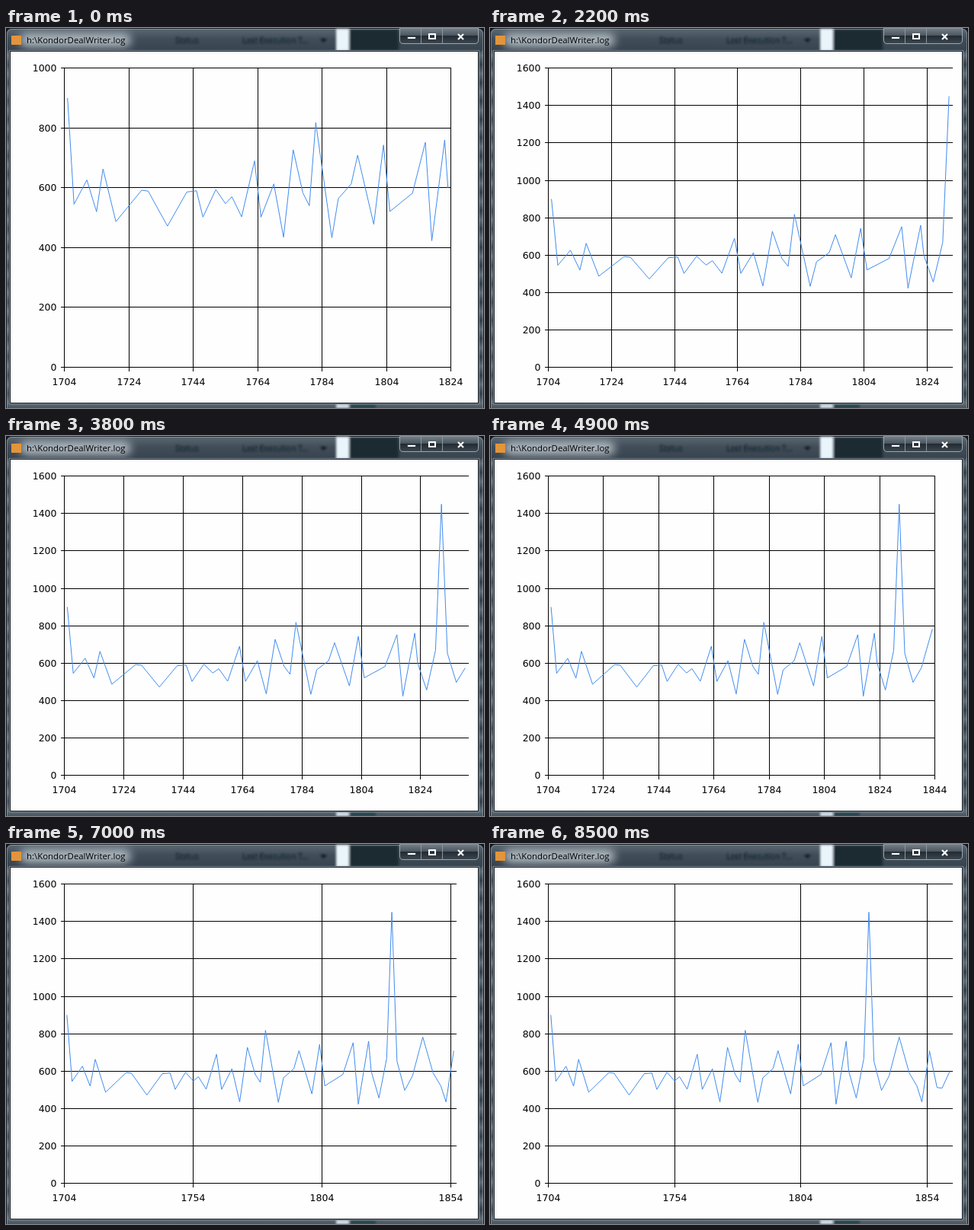
An HTML page that plays this animation: 627x499 px, repeating every 9 s.

```html
<!DOCTYPE html>
<html lang="en">
<head>
<meta charset="utf-8">
<title>Log chart</title>
<style>
  html, body { margin: 0; width: 100%; height: 100%; overflow: hidden; background: #1d252d; }
  svg { display: block; }
  .title { font: 11.4px "Open Sans", "Noto Sans", sans-serif; fill: #000; }
  .haze { font: 10.5px "Open Sans", "Noto Sans", sans-serif; fill: #10171d; }
  .label { font: 12.5px "DejaVu Sans", sans-serif; fill: #000; }
  .grid { stroke: #000; fill: none; shape-rendering: crispEdges; }
  .data { stroke: #418cf0; fill: none; stroke-linejoin: round; }
</style>
</head>
<body>
<svg width="627" height="499" viewBox="0 0 627 499">
  <defs>
    <linearGradient id="bar" x1="0" y1="0" x2="0" y2="1">
      <stop offset="0" stop-color="#5b6771"/>
      <stop offset=".45" stop-color="#414d58"/>
      <stop offset="1" stop-color="#36424c"/>
    </linearGradient>
    <linearGradient id="side" gradientUnits="userSpaceOnUse" x1="0" y1="0" x2="0" y2="24" spreadMethod="repeat">
      <stop offset="0" stop-color="#35414c"/>
      <stop offset=".5" stop-color="#62707c"/>
      <stop offset="1" stop-color="#35414c"/>
    </linearGradient>
    <linearGradient id="button" x1="0" y1="0" x2="0" y2="1">
      <stop offset="0" stop-color="#77828b"/>
      <stop offset=".48" stop-color="#4a555e"/>
      <stop offset=".5" stop-color="#222b33"/>
      <stop offset="1" stop-color="#3b4750"/>
    </linearGradient>
    <filter id="soft" x="-20%" y="-80%" width="140%" height="260%"><feGaussianBlur stdDeviation="6"/></filter>
    <filter id="blur" x="-20%" y="-50%" width="140%" height="200%"><feGaussianBlur stdDeviation="1.5"/></filter>
  </defs>

  <!-- window frame -->
  <rect width="627" height="499" fill="#12181e"/>
  <rect x=".5" y=".5" width="626" height="505" rx="7" fill="url(#side)" stroke="#10161c"/>
  <rect x="1" y="1" width="625" height="30" rx="6" fill="url(#bar)"/>
  <g filter="url(#blur)">
    <rect x="433" y="1" width="17" height="29" fill="#eaf4fb"/>
    <rect x="433" y="494" width="17" height="5" fill="#dbe8f1"/>
    <rect x="451" y="2" width="64" height="28" fill="#1b2a30"/>
    <rect x="451" y="495" width="34" height="4" fill="#24424a"/>
    <text class="haze" x="222" y="20">Status</text>
    <text class="haze" x="310" y="20">Last Execution T...</text>
    <path d="M412 14h9l-4.5 5z" fill="#10171d"/>
  </g>
  <rect x="1.5" y="1.5" width="624" height="505" rx="6" fill="none" stroke="#c9d3da" opacity=".4"/>
  <rect x="18" y="7" width="146" height="18" rx="9" fill="#c3ccd3" opacity=".85" filter="url(#soft)"/>
  <rect x="7" y="10" width="13" height="12" fill="#e2953b"/>
  <text class="title" x="27" y="20">h:\KondorDealWriter.log</text>

  <!-- window buttons -->
  <path d="M516.5 0V16q0 4.5 4.5 4.5H615q4.500 0 4.500-4.500V0z" fill="url(#button)" stroke="#9aa5ad"/>
  <path d="M544.500 0V20M572.500 0V20" stroke="#8b969f"/>
  <rect x="526.500" y="11.500" width="11" height="3" fill="#fff" stroke="#39434b"/>
  <rect x="555" y="8" width="8" height="6" fill="none" stroke="#fff" stroke-width="2"/>
  <path d="M593 8l7 7M600 8l-7 7" stroke="#fff" stroke-width="2.200"/>

  <!-- client area -->
  <rect x="4.500" y="29.500" width="616" height="464" fill="none" stroke="#7d8993"/>
  <rect x="5.500" y="30.500" width="614" height="462" fill="#fefefe" stroke="#11161b"/>
  <g id="chart" transform="translate(.5 .5)"></g>
</svg>
<script>
  // turning points already logged: [sequence number, value]
  const logged = [
    [1705, 900], [1707, 545], [1711, 626], [1714, 520], [1716, 663], [1720, 487], [1728, 592],
    [1730, 589], [1736, 472], [1742, 586], [1745, 590], [1747, 502], [1751, 594], [1754, 547],
    [1756, 570], [1759, 503], [1763, 690], [1765, 502], [1769, 613], [1772, 435], [1775, 727],
    [1778, 583], [1780, 540], [1782, 818], [1787, 433], [1789, 564], [1793, 613], [1795, 709],
    [1800, 478], [1803, 743], [1805, 521], [1812, 582], [1816, 752], [1818, 423], [1822, 760],
    [1823, 600]
  ];
  // points that arrive while the log grows: [sequence number, value, ms]
  const arriving = [
    [1826, 456, 200], [1829, 668, 800], [1831, 1450, 2200], [1833, 653, 2800], [1836, 497, 3200],
    [1839, 574, 3800], [1843, 782, 4900], [1847, 590, 5500], [1850, 521, 6000], [1852, 435, 6400],
    [1855, 708, 7000], [1858, 512, 7500], [1860, 509, 8000], [1863, 598, 8500]
  ];
  const loop = 9000, start = 1704;
  const plot = { left: 76, right: 605.75, top: 52.25, bottom: 445, lastLabel: 583.4 };
  const chart = document.getElementById("chart");

  const label = (x, y, anchor, text) =>
    `<text class="label" x="${x}" y="${y}" text-anchor="${anchor}">${text}</text>`;

  function draw(points) {
    const range = points[points.length - 1][0] + 1 - start;
    const gap = range > 150 ? 50 : 20;
    const yMax = Math.max(...points.map(p => p[1])) > 1000 ? 1600 : 1000;

    // the plot narrows when its last label would not fit
    const lastTick = Math.floor(range / gap) * gap;
    const scale = Math.min((plot.right - plot.left) / range, (plot.lastLabel - plot.left) / lastTick);
    const xAt = n => plot.left + n * scale;
    const yAt = v => plot.bottom - v * (plot.bottom - plot.top) / yMax;
    const edge = Math.round(xAt(range));

    let grid = "", labels = "";
    for (let v = 0; v <= yMax; v += 200) {
      const y = Math.round(yAt(v));
      grid += `M${plot.left - 5} ${y}H${edge + .5}`;
      labels += label(66, y + 4.5, "end", v);
    }
    for (let n = 0; n <= range; n += gap) {
      const x = Math.round(xAt(n));
      grid += `M${x} ${Math.round(plot.top)}V${plot.bottom + 5}`;
      labels += label(x, 468.5, "middle", start + n);
    }
    const line = points.map(([n, v]) => xAt(n - start).toFixed(2) + "," + yAt(v).toFixed(2)).join(" ");
    chart.innerHTML = `<path class="grid" d="${grid}"/><polyline class="data" points="${line}"/>${labels}`;
  }

  let shown = -1;
  function tick() {
    const t = performance.now() % loop;
    const fresh = arriving.filter(p => p[2] <= t);
    if (fresh.length !== shown) {
      shown = fresh.length;
      draw([...logged, ...fresh]);
    }
    requestAnimationFrame(tick);
  }
  tick();
</script>
</body>
</html>
```
